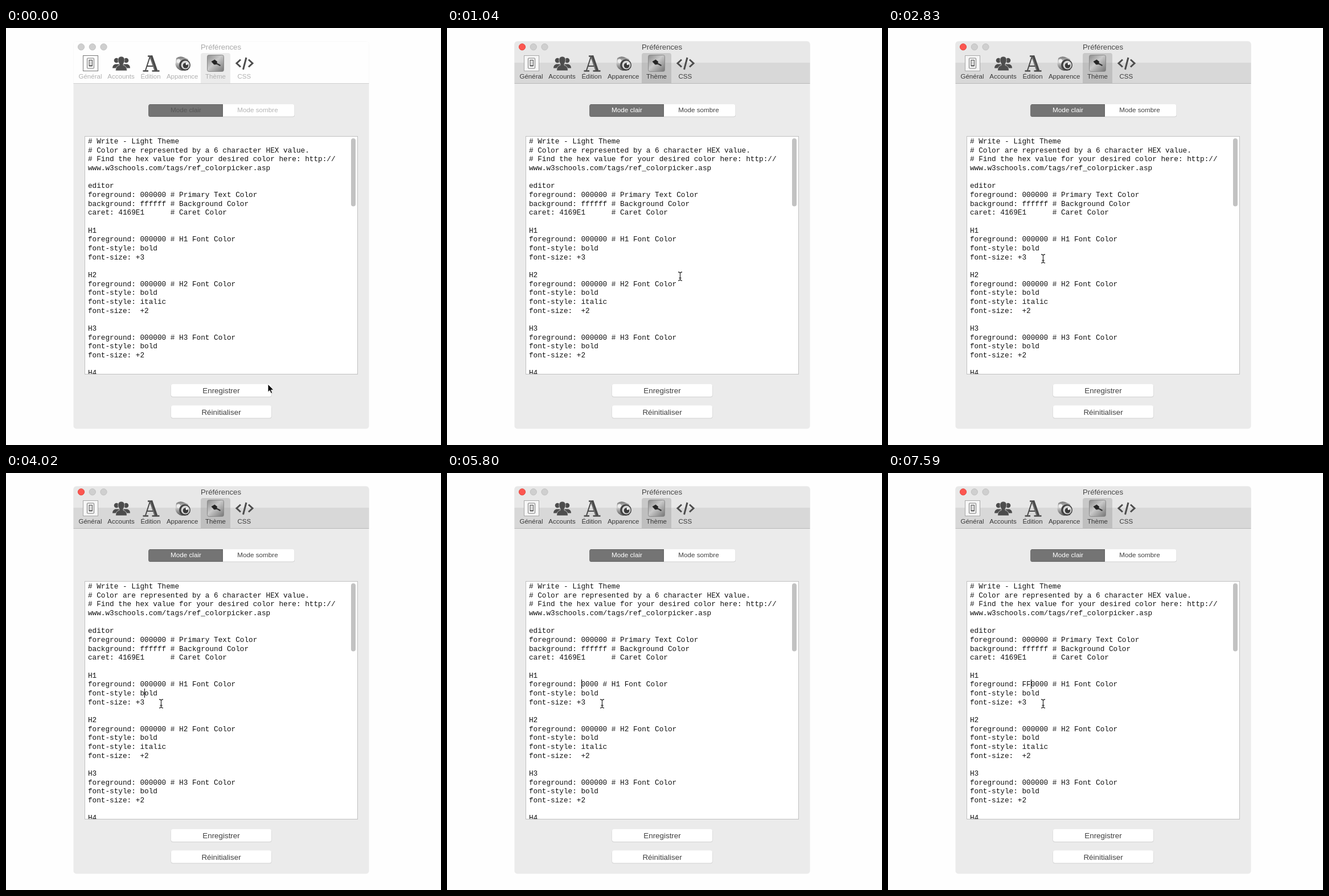
Recreate the animation shown at these times as an HTML page. Size 764 by 733 pixels, loop 8 s.

```html
<!DOCTYPE html>
<html lang="fr">
<head>
<meta charset="utf-8">
<title>Préférences</title>
<style>
html, body { margin: 0; width: 100%; height: 100%; overflow: hidden; background: #fefefe; }
svg {
  display: block;
  --bar: #fefefe; --bar-low: #fefefe; --tab: #ebebeb; --tab-low: #ebebeb; --line: #d0d0d0;
  --title: #a9a9a9; --label: #b0b0b0; --close: #cfcfcf; --close-edge: #c2c2c2;
  --seg-on: #575757; --seg-off: #b4b4b4; --plate: #ffffff; --plate-edge: #777777;
}
svg.active {
  --bar: #e8e8e8; --bar-low: #d8d8d8; --tab: #c9c9c9; --tab-low: #bfbfbf; --line: #b9b9b9;
  --title: #484848; --label: #383838; --close: #fc5650; --close-edge: #e2463f;
  --seg-on: #ffffff; --seg-off: #424242; --plate: #f6f6f6; --plate-edge: #a8a8a8;
}
text { font-family: "Liberation Sans", Arial, sans-serif; text-anchor: middle; }
#code text { font: 12.71px "Liberation Mono", "Courier New", monospace; text-anchor: start; white-space: pre; fill: #111; }
.label { font-size: 11.5px; fill: var(--label); }
.segment { font-size: 11.7px; }
.button { font-size: 13.4px; fill: #404040; }
</style>
</head>
<body>
<svg id="stage" width="764" height="733" viewBox="0 0 764 733">
  <defs>
    <linearGradient id="metal" x2="1" y2="1">
      <stop stop-color="#8c8c8c"/><stop offset=".45" stop-color="#c9c9c9"/><stop offset="1" stop-color="#747474"/>
    </linearGradient>
    <linearGradient id="barrel" x2="0" y2="1">
      <stop stop-color="#777"/><stop offset=".4" stop-color="#d2d2d2"/><stop offset="1" stop-color="#555"/>
    </linearGradient>
    <clipPath id="window"><rect x="118.5" y="23.5" width="519" height="681" rx="5"/></clipPath>
    <clipPath id="view"><rect x="139" y="191" width="478" height="417"/></clipPath>
  </defs>

  <g clip-path="url(#window)">
    <rect x="118" y="23" width="520" height="682" fill="#ebebeb"/>
    <rect x="118" y="23" width="520" height="38" fill="var(--bar)"/>
    <rect x="118" y="61" width="520" height="36" fill="var(--bar-low)"/>
    <path d="M342 61V48Q342 44 346 44H390Q394 44 394 48V61Z" fill="var(--tab)"/>
    <rect x="342" y="61" width="52" height="36" fill="var(--tab-low)"/>
    <rect x="118" y="97" width="520" height="1" fill="var(--line)"/>
  </g>
  <circle cx="132" cy="33.3" r="5.6" fill="var(--close)" stroke="var(--close-edge)"/>
  <g fill="#cfcfcf" stroke="#c0c0c0"><circle cx="151.8" cy="33.3" r="5.6"/><circle cx="171.5" cy="33.3" r="5.6"/></g>
  <text x="377.5" y="38" font-size="13.2" fill="var(--title)">Préférences</text>

  <!-- switch -->
  <rect x="135.5" y="48.5" width="26" height="27" fill="var(--plate)" stroke="var(--plate-edge)"/>
  <rect x="142.5" y="53" width="12" height="18" rx="1" fill="#f4f4f4" stroke="#777"/>
  <rect x="146" y="56.5" width="5.5" height="10" fill="#ddd" stroke="#555"/>
  <path d="M146 66.5H151.5" stroke="#333" stroke-width="1.5"/>

  <!-- people -->
  <g fill="#4d4d4d">
    <circle cx="194" cy="57" r="4.3"/><circle cx="211" cy="57" r="4.3"/>
    <path d="M187 70.5Q187 65 192 63.5H213Q218 65 218 70.5Z"/>
    <path d="M192.5 75Q192.5 67 199 65.5V63Q196.700 60 196.700 56.500Q197 50 202.500 50Q208 50 208.300 56.500Q208.300 60 206 63V65.500Q212.500 67 212.500 75Z" stroke="#e9e9e9" stroke-width=".7"/>
  </g>

  <!-- letter -->
  <g fill="none" stroke="#4a4a4a">
    <path d="M253 50L245 74.500M247 67H260" stroke-width="2"/>
    <path d="M254.500 49L263.500 75" stroke-width="5.500"/>
    <path d="M240.500 75.500H250M256.500 75.500H269.500M249 49.500H257" stroke-width="2.500"/>
    <path d="M253.500 51L261.500 74.500" stroke="#999" stroke-width=".8"/>
  </g>

  <!-- lens -->
  <path d="M299 53Q304 49 311 51L320 55V74L309 75Q299 73 297.500 64Z" fill="url(#barrel)"/>
  <circle cx="303" cy="58" r="3.500" fill="#eee"/>
  <circle cx="314" cy="65" r="10" fill="#424242"/>
  <circle cx="315" cy="65" r="7.500" fill="#d9d9d9"/>
  <circle cx="315.500" cy="66" r="4.800" fill="#3a3a3a"/>
  <circle cx="317.500" cy="63" r="2" fill="#fff"/>

  <!-- brush tile -->
  <rect x="353.500" y="47.500" width="29" height="29" rx="3" fill="url(#metal)" stroke="#8b8b8b"/>
  <path d="M360.500 59L366.500 55.500L371 59L370 64L365.500 64.500Z" fill="#252525"/>
  <path d="M369 62L376.500 66" stroke="#303030" stroke-width="2.200"/>

  <path d="M412 55.500L405 62L412 68.500M426 55.500L433 62L426 68.500M422 52L416.500 73" fill="none" stroke="#4d4d4d" stroke-width="3"/>
  <g id="labels"></g>

  <rect x="250" y="134.500" width="257" height="22" rx="3.500" fill="#d2d2d2"/>
  <rect x="250" y="134" width="256.500" height="21.500" rx="3.500" fill="#fff"/>
  <path d="M381 134V156H253.500Q250 156 250 152.500V137.500Q250 134 253.500 134Z" fill="#747474"/>
  <path d="M380.500 134V156M252 155.500H381M252 134.500H381" stroke="#646464"/>
  <text class="segment" x="316" y="148" fill="var(--seg-on)">Mode clair</text>
  <text class="segment" x="442" y="148" fill="var(--seg-off)">Mode sombre</text>

  <rect x="138.500" y="190.500" width="479" height="418" fill="#fff" stroke="#c0c0c0"/>
  <g id="code" clip-path="url(#view)"></g>
  <rect x="606" y="194" width="8" height="119.500" rx="4" fill="#c2c2c2"/>
  <rect id="caret" width="1" height="16" fill="#000"/>

  <g id="buttons"></g>

  <g id="arrow">
    <path d="M1 2V15L4 12L6 17L9 16L7 11H11Z" fill="#000" opacity=".15"/>
    <path d="M0 0V14L3.200 11.200L5.400 16.300L7.800 15.300L5.600 10.300H10Z" fill="#000" stroke="#fff" stroke-width="1"/>
  </g>
  <g id="beam" fill="none">
    <path d="M-3.500 -7.500Q0 -7.500 0 -5V5Q0 7.500 -3.500 7.500M3.500 -7.500Q0 -7.500 0 -5M0 5Q0 7.500 3.500 7.500M-2 3H2" stroke="#333" stroke-width="1.300"/>
  </g>
</svg>
<script>
const $ = id => document.getElementById(id);
const LOOP = 8000, LEFT = 144, CHAR = 7.627, PITCH = 15.66, EDIT_LINE = 11;

const lines = `# Write - Light Theme
# Color are represented by a 6 character HEX value.
# Find the hex value for your desired color here: http://
www.w3schools.com/tags/ref_colorpicker.asp

editor
foreground: 000000 # Primary Text Color
background: ffffff # Background Color
caret: 4169E1      # Caret Color

H1
foreground: 000000 # H1 Font Color
font-style: bold
font-size: +3

H2
foreground: 000000 # H2 Font Color
font-style: bold
font-style: italic
font-size:  +2

H3
foreground: 000000 # H3 Font Color
font-style: bold
font-size: +2

H4`.split("\n");

$("code").innerHTML = lines.map((line, i) =>
  `<text x="${LEFT}" y="${203 + i * PITCH}">${line}</text>`).join("");
const editedLine = $("code").children[EDIT_LINE];

$("labels").innerHTML = [["Général", 148], ["Accounts", 202], ["Édition", 254],
  ["Apparence", 309.7], ["Thème", 368], ["CSS", 418.3]]
  .map(([name, x]) => `<text class="label" x="${x}" y="89">${name}</text>`).join("");

$("buttons").innerHTML = [["Enregistrer", 626], ["Réinitialiser", 663.5]].map(([name, y]) =>
  `<rect x="289.500" y="${y + 1}" width="177" height="22" rx="3.500" fill="#d2d2d2"/>
   <rect x="290" y="${y}" width="176" height="22" rx="3.500" fill="#fff"/>
   <text class="button" x="378" y="${y + 16}">${name}</text>`).join("");

// Each track holds its value until the next time: [time, ...values]
const pointer = [[0, 460, 626], [150, 460, 602], [300, 459, 540], [450, 456, 482],
  [750, 432, 458], [900, 409, 436], [1040, 409.5, 436.5], [1190, 390, 432], [1340, 352, 424],
  [1490, 314, 414], [1640, 289, 408], [1790, 275, 406], [1940, 273, 406.5], [2380, 272.5, 405.5]];
// Caret column and line; no values means hidden
const caretTrack = [[0], [2080, 13, 13], [2830], [3270, 13, 13], [3870], [4020, 13, 12],
  [4170, 13, 11], [4760], [4910, 14, 11], [5350], [5650, 13, 11], [5800, 12, 11],
  [6240, 13, 11], [6390, 14, 11], [6990], [7590, 14, 11]];
const hexTrack = [[0, "000000"], [5650, "00000"], [5800, "0000"], [6240, "F0000"], [6390, "FF0000"]];

const at = (track, time) => track.findLast(key => key[0] <= time).slice(1);
const show = (node, visible) => node.setAttribute("visibility", visible ? "visible" : "hidden");

function draw() {
  const time = performance.now() % LOOP;
  const active = time >= 1040;
  $("stage").classList.toggle("active", active);

  const [x, y] = at(pointer, time);
  show($("arrow"), !active);
  show($("beam"), active);
  $(active ? "beam" : "arrow").setAttribute("transform", `translate(${x} ${y})`);

  const [column, line] = at(caretTrack, time);
  show($("caret"), column !== undefined);
  if (column !== undefined) {
    $("caret").setAttribute("x", Math.round(LEFT + column * CHAR));
    $("caret").setAttribute("y", Math.round(363 + (line - EDIT_LINE) * PITCH));
  }

  const text = `foreground: ${at(hexTrack, time)[0]} # H1 Font Color`;
  if (editedLine.textContent !== text) editedLine.textContent = text;
  requestAnimationFrame(draw);
}
draw();
</script>
</body>
</html>
```
